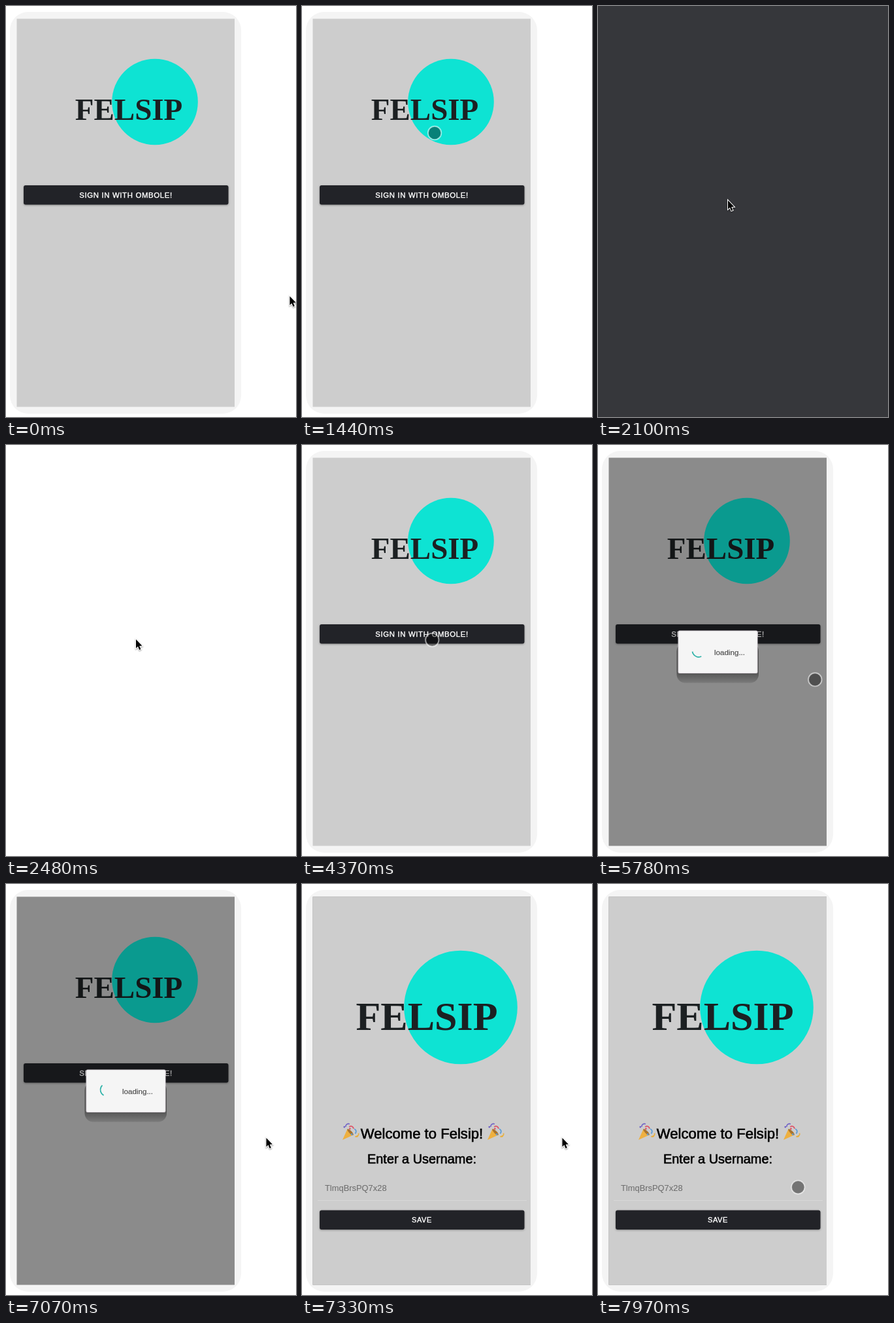
Write an HTML page with a canvas that moves like this. It is 444 px wide and 628 px high and loops after 8000 ms.

```html
<!DOCTYPE html>
<html lang="en">
<head>
<meta charset="utf-8">
<title>Sign in</title>
<style>
  html, body { margin: 0; width: 100%; height: 100%; overflow: hidden; background: #fff; }
  canvas { display: block; width: 444px; height: 628px; }
</style>
</head>
<body>
<canvas id="stage" width="444" height="628"></canvas>
<script>
const ctx = document.getElementById('stage').getContext('2d');
const LOOP = 8000;
const TICK = 129;
const TAU = Math.PI * 2;
const SANS = '"Liberation Sans", Arial, sans-serif';
const SERIF = '"Liberation Serif", "Times New Roman", serif';
const SCREEN_COLOR = '#cdcdcd';
const time = { dark: 2100, blank: 2480, tap: 4370, welcome: 7070 };

// Each move starts at a moment, takes some ticks and may bow sideways.
const startPoint = { x: 434.5, y: 443.5 };
const moves = [
  { at: 130, ticks: 1, x: 397, y: 448 },
  { at: 550, ticks: 5, x: 134, y: 124 },
  { at: 1310, ticks: 5, x: 199, y: 297, bow: 45 },
  { at: 5270, ticks: 6, x: 398.5, y: 388 },
  { at: 7840, ticks: 2, x: 306, y: 462.5 }
];

const clamp = v => Math.max(0, Math.min(1, v));
const ticksSince = (t, start) => Math.floor((t - start) / TICK);

function pointerAt(t) {
  let { x, y } = startPoint;
  for (const { at, ticks, x: endX, y: endY, bow = 0 } of moves) {
    const k = clamp((ticksSince(t, at) + 1) / ticks);
    x += (endX - x) * k + bow * Math.sin(Math.PI * k);
    y += (endY - y) * k;
  }
  return [x, y];
}

function box(x, y, w, h, r, fill) {
  ctx.fillStyle = fill;
  ctx.beginPath();
  ctx.roundRect(x, y, w, h, r);
  ctx.fill();
}

function disc(x, y, r, fill) {
  ctx.fillStyle = fill;
  ctx.beginPath();
  ctx.arc(x, y, r, 0, TAU);
  ctx.fill();
}

function arc(x, y, r, start, sweep, width, color) {
  ctx.strokeStyle = color;
  ctx.lineWidth = width;
  ctx.beginPath();
  ctx.arc(x, y, r, start, start + sweep);
  ctx.stroke();
}

function label(text, x, y, size, color, { align = 'center', spacing = 0, weight = 0 } = {}) {
  ctx.font = `${size}px ${SANS}`;
  ctx.letterSpacing = `${spacing}px`;
  ctx.textAlign = align;
  ctx.fillStyle = ctx.strokeStyle = color;
  ctx.fillText(text, x, y);
  if (weight) {
    ctx.lineWidth = weight;
    ctx.strokeText(text, x, y);
  }
  ctx.letterSpacing = '0px';
}

function button(text, y, size) {
  ctx.save();
  ctx.shadowColor = 'rgba(0,0,0,.35)';
  ctx.shadowBlur = 3;
  ctx.shadowOffsetY = 1;
  box(27, y, 313.5, 29.5, 3, '#222328');
  ctx.restore();
  label(text, 183.5, y + 18.8, size, '#fff', { spacing: 0.65, weight: 0.4 });
}

// A plain disc with the name set over it, sized by the type.
function brand(discX, discY, wordX, baseline, size) {
  disc(discX, discY, size * 1.4, '#0ee3d3');
  ctx.font = `bold ${size}px ${SERIF}`;
  ctx.textAlign = 'center';
  ctx.fillStyle = '#1c2022';
  ctx.fillText('FELSIP', wordX, baseline);
}

function partyPopper(x, y) {
  ctx.save();
  ctx.translate(x, y);
  ctx.rotate(-Math.PI / 4);
  ctx.fillStyle = '#eeb040';
  ctx.beginPath();
  ctx.moveTo(0, 0);
  ctx.lineTo(17, -6.5);
  ctx.lineTo(17, 6.5);
  ctx.fill();
  ctx.fillStyle = '#a9742f';
  ctx.beginPath();
  ctx.ellipse(17, 0, 2, 6.5, 0, 0, TAU);
  ctx.fill();
  ['#6f62c6', '#dd5468', '#5a9bd8', '#e8b040'].forEach((color, i) => {
    const side = i - 1.5;
    arc(21, side * 5.5, 4, side - 1, 2.2, 1.8, color);
    disc(16 + 4 * (i % 2), side * 8, 1.4, color);
  });
  ctx.restore();
}

function signInPage() {
  brand(228, 146.5, 188, 174, 47);
  button('SIGN IN WITH OMBOLE!', 274, 11.4);
}

function welcomePage() {
  brand(243, 188.5, 191, 223, 62);
  partyPopper(62, 391);
  partyPopper(284, 391);
  label('Welcome to Felsip!', 183.5, 389, 22.1, '#000', { weight: 0.6 });
  label('Enter a Username:', 183.5, 427, 19.9, '#000', { weight: 0.6 });
  label('TlmqBrsPQ7x28', 35, 469, 12.9, '#707070', { align: 'left', weight: 0.1 });
  box(24, 483, 320, 1, 0, '#d8d8d8');
  button('SAVE', 498.5, 11);
}

function loadingDialog(t) {
  const shade = ctx.createLinearGradient(0, 346, 0, 364);
  shade.addColorStop(0, '#505050');
  shade.addColorStop(1, '#7c7c7c');
  box(120.5, 302, 125.5, 61.5, 13, shade);
  box(122.5, 283.5, 122, 65.5, 2.5, '#dcd6dc');
  box(123.5, 284.5, 120, 63.5, 2, '#f5f5f5');
  const turn = 0.4 + ticksSince(t, time.tap) * TICK / 1120;
  arc(154, 314.5, 9.5, turn * TAU - Math.PI * 0.75, 1.9, 1.8, '#2fb3a9');
  label('loading...', 178, 321, 11.6, '#4c4c4c', { align: 'left', weight: 0.2 });
}

const fillScreen = color => box(16, 19, 335, 594, 0, color);

function phone(t) {
  box(6, 9, 354, 614, 28, '#f4f4f4');
  ctx.save();
  ctx.beginPath();
  ctx.rect(16.5, 19.5, 333.5, 593);
  ctx.clip();
  fillScreen(SCREEN_COLOR);
  signInPage();

  // The dialog fades in after the tap and the next page covers it.
  const dim = t < time.tap ? 0 : clamp(ticksSince(t, time.tap) / 2);
  if (dim) {
    ctx.globalAlpha = dim;
    fillScreen('rgba(0,0,0,.32)');
    loadingDialog(t);
  }
  const enter = clamp(ticksSince(t, time.welcome) / 2);
  if (enter) {
    ctx.globalAlpha = enter;
    fillScreen(SCREEN_COLOR);
    ctx.translate(0, 20 * (1 - enter) ** 2);
    welcomePage();
  }
  ctx.restore();
}

function arrow(x, y) {
  ctx.save();
  ctx.translate(x, y);
  ctx.beginPath();
  [[0, 0], [0, 13.5], [3, 10.7], [5.2, 16], [7.4, 15.1], [5.2, 10], [9.4, 9.8]]
    .forEach(([px, py]) => ctx.lineTo(px, py));
  ctx.closePath();
  ctx.shadowColor = 'rgba(0,0,0,.4)';
  ctx.shadowBlur = 2;
  ctx.shadowOffsetY = 1;
  ctx.lineWidth = 2;
  ctx.strokeStyle = '#fff';
  ctx.stroke();
  ctx.shadowColor = 'transparent';
  ctx.fillStyle = '#000';
  ctx.fill();
  ctx.restore();
}

function touch(x, y) {
  disc(x, y, 10, 'rgba(0,0,0,.43)');
  arc(x, y, 10.2, 0, TAU, 1.9, 'rgba(255,255,255,.55)');
}

function draw(t) {
  const phoneHidden = t >= time.dark && t < time.tap;
  const dark = phoneHidden && t < time.blank;
  box(0, 0, 444, 628, 0, dark ? '#36373b' : '#fff');
  if (!phoneHidden) phone(t);
  const [x, y] = pointerAt(t);
  if (!phoneHidden && x < 350) touch(x + 0.3, y + 0.8);
  else arrow(x, y);
}

const begin = performance.now();
function frame() {
  draw((performance.now() - begin) % LOOP);
  requestAnimationFrame(frame);
}
frame();
</script>
</body>
</html>
```
